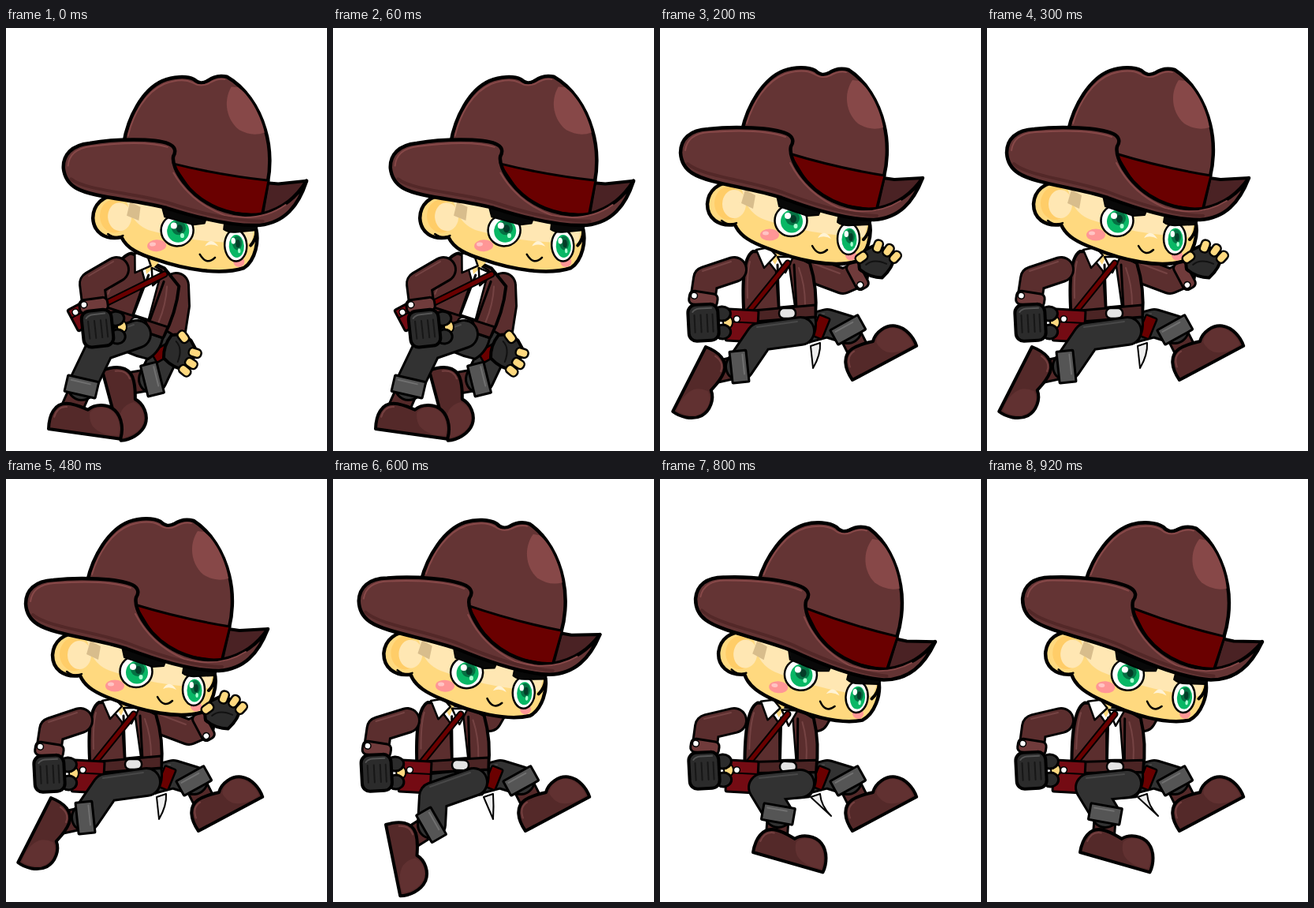
Recreate the animation shown at these times as an HTML page. Size 407 px wide and 536 px high, loop 1 s.

```html
<!DOCTYPE html>
<html lang="en">
<head>
<meta charset="utf-8">
<title>Running adventurer</title>
<style>
html, body { margin: 0; width: 100%; height: 100%; overflow: hidden; background: #fff; }
svg { display: block; width: 100%; height: 100%; }
</style>
</head>
<body>
<svg id="stage" viewBox="0 0 407 536" stroke-linejoin="round" stroke-linecap="round"></svg>
<script>
const C = {
  hat: '#643434', lit: '#874848', coat: '#5b2e2e', boot: '#542929', toe: '#613131',
  pants: '#323232', cuff: '#555', glove: '#2b2b2b', red: '#6a0000', bag: '#740b13',
  skin: '#ffd97f', pale: '#ffe7b3', deep: '#ffcd68'
};

// Which pose is held in each tenth of the loop.
const steps = [0, 1, 2, 3, 3, 3, 4, 5, 6, 6];

// Shift x, shift y, turn.
const head = [[54.5, 11, -3], [26, .5, -.7], [1, 0, 0], [0, 0, 0], [3, 2, 2], [7, 4.8, 3.3], [10, 5.5, 4.2]];
const torso = [[7, 13, 23], [5, 6, 8], [0, 0, 0], [0, 0, 0], [0, 1, 1.5], [1, 2, 2.5], [1, 3, 3.5]];

// Hip, knee, trouser cuff with its turn, boot heel with its turn.
const legKeys = ['hx', 'hy', 'kx', 'ky', 'cx', 'cy', 'ca', 'bx', 'by', 'ba'];
const asLeg = row => Object.fromEntries(legKeys.map((k, i) => [k, row[i]]));
const nearLeg = [
  [166, 388, 120, 404, 96, 454, 13, 54, 508, 8],
  [178, 386, 122, 398, 97, 442, 52, 34, 453, 61],
  [178, 384, 127, 391, 101, 429, 84, 58, 404, 117],
  [178, 384, 127, 391, 101, 429, 84, 57, 404, 117],
  [178, 384, 127, 402, 125, 438, 60, 67, 438, 78.6],
  [178, 386, 129, 393, 141, 432, 25, 95, 467, 39.6],
  [178, 386, 130, 391, 150, 424, 10, 118, 473, 16]
].map(asLeg);
const farRun = [182, 382, 212, 374, 238, 382, -29, 244, 446, -28];
const farLeg = [
  [180, 390, 205, 405, 186, 445, 76, 122, 434, 75],
  [185, 387, 221, 402, 220, 433, 10, 173, 476, 21.6],
  farRun, farRun, farRun, farRun, farRun
].map(asLeg);

// Near arm: sleeve points, hand x, y, turn. The run poses differ only slightly.
const nearArm = [
  { s: [140, 306, 109, 324, 112, 348], h: [122, 380, -6], cuff: [111, 351, -8] },
  { s: [116, 302, 82, 318, 82, 342], h: [92, 374, 4], cuff: [82, 348, 12] },
  ...[0, 0, 1, 2, 4].map((k, i) => ({
    s: [94, 306, 58 + k / 2, 318 - k, 55 + k / 2, 338 - k / 2],
    h: [61 + k / 4, 373 - k, -3], cuff: [55 + k / 2, 343 - k, 9]
  }))
];
const farRaised = { s: [200, 309, 232, 321, 248, 314], cuff: [250, 314, -118], h: [272, 297, -60] };
const farTucked = { s: [192, 302, 198, 304, 206, 290] };
const farArm = [
  { s: [216, 326, 217, 352, 212, 384], h: [219, 408, 28] },
  { s: [202, 318, 216, 354, 236, 362], cuff: [239, 362, -78], h: [265, 368, 0] },
  farRaised, farRaised, farTucked, farTucked, farTucked
];

// Strap ends, bag place, turn and size.
const bagRun = { strap: 'M162 298L111 361', at: [104, 377, 3], r: 20 };
const bag = [
  { strap: 'M201 312L92 366', at: [98, 364, -28], r: 15 },
  { strap: 'M187 300L116 362', at: [104, 369, 5], r: 18 },
  bagRun, bagRun, bagRun, bagRun, bagRun
];

// Sheath x, y, turn and the tip of the blade.
const knifeRun = [204, 379, 22];
const knife = [
  [200, 411, 60, 0, 0], [207, 398, 8, 185, 449],
  [...knifeRun, 194, 431], [...knifeRun, 194, 431],
  [...knifeRun, 203, 431], [...knifeRun, 212, 428], [...knifeRun, 217, 427]
];

const path = (d, fill = 'none', w = 3, line = '#000') =>
  `<path d="${d}" fill="${fill}" stroke="${w ? line : 'none'}" stroke-width="${w}"/>`;
const oval = (x, y, rx, ry, fill, w = 0) =>
  `<ellipse cx="${x}" cy="${y}" rx="${rx}" ry="${ry}" fill="${fill}" stroke="${w ? '#000' : 'none'}" stroke-width="${w}"/>`;
const box = (x, y, w, h, r, fill, line = 3) =>
  `<rect x="${x}" y="${y}" width="${w}" height="${h}" rx="${r}" fill="${fill}" stroke="#000" stroke-width="${line}"/>`;
const put = ([x, y, a], body) => `<g transform="translate(${x} ${y}) rotate(${a})">${body}</g>`;
const turn = ([x, y, a], px, py, body) =>
  `<g transform="translate(${x} ${y}) rotate(${a} ${px} ${py})">${body}</g>`;

function limb(p, w, fill) {
  const d = `M${p[0]} ${p[1]}` + (p.length > 4 ? `Q${p[2]} ${p[3]} ${p[4]} ${p[5]}` : `L${p[2]} ${p[3]}`);
  return path(d, 'none', w + 6) + path(d, 'none', w, fill);
}

function bend(p, w, fill, shine) {
  const d = `M${p[0]} ${p[1]}L${p[2]} ${p[3]}L${p[4]} ${p[5]}`;
  const hi = `M${p[0] - 4} ${p[1] - w / 2 + 4}L${p[2] - 4} ${p[3] - w / 2 + 4}`;
  return path(d, 'none', w + 6) + path(d, 'none', w, fill) + path(hi, 'none', 2, shine);
}

function boot() {
  return path('M0 0C-2-18 3-33 18-35C30-36 38-33 46-31C54-40 70-42 80-35C91-27 94-11 92 0Z', C.boot, 4) +
    path('M49-28C56-38 70-39 79-32C88-25 90-12 89-4C76-1 63-4 55-11Q49-18 49-28Z', C.toe, 0) +
    path('M5-16Q7-30 19-31', 'none', 2, '#754040');
}

function leg(l) {
  const a = l.ba * Math.PI / 180, x = 24, y = -24;
  const ax = l.bx + x * Math.cos(a) - y * Math.sin(a);
  const ay = l.by + x * Math.sin(a) + y * Math.cos(a);
  return limb([l.cx, l.cy, ax, ay], 24, C.boot) +
    put([l.bx, l.by, l.ba], boot()) +
    bend([l.hx, l.hy, l.kx, l.ky, l.cx, l.cy], 32, C.pants, '#484848') +
    put([l.cx, l.cy, l.ca], box(-20, -10, 40, 21, 1, C.cuff) + path('M-15-5H10', 'none', 2, '#707070'));
}

function sleeve(arm) {
  return bend(arm.s, 28, C.coat, '#754343') +
    (arm.cuff ? put(arm.cuff, box(-18, -8, 36, 17, 6, '#703b3b') + oval(-12, -2, 4, 4, '#fff', 1.5)) : '');
}

function nearHand(at) {
  const grooves = [-17, -9, -1, 6].map(x => path(`M${x}-10V12`, 'none', 2, '#171717')).join('');
  return put(at, oval(25, 1, 6, 8, C.skin, 2) + oval(18, -10, 11, 9, C.glove, 3) +
    oval(18, 13, 10, 9, C.glove, 3) + box(-25, -23, 38, 46, 10, C.glove, 4) +
    path('M-19-14Q-16-18-10-18H5', 'none', 2, '#555') + grooves);
}

function farHand(at) {
  const finger = (x, y, a) => put([x, y, a], box(-8, -6, 16, 11, 5, C.skin, 2.5));
  return put(at, path('M-17-12Q-6-22 8-18L20-10Q24 4 18 18Q6 24-12 18Q-20 4-17-12Z', C.glove, 4) +
    path('M-8-8Q4-4 6 14', 'none', 2, '#111') +
    finger(-3, -17, 25) + finger(20, -6, -10) + finger(22, 8, 5) + finger(19, 20, 12));
}

function coat() {
  return path('M120 374L196 364Q201 382 190 398Q160 404 126 396Z', C.pants) +
    path('M118 283C104 291 104 330 107 372L197 366Q200 330 190 298L164 284Z', C.coat, 4) +
    path('M128 284L162 288L171 352L150 354L147 308Z', '#fff', 2.5) +
    path('M133 280H155L146 300Z', C.skin, 0) +
    path('M149 300L151 355M170 300L173 355', 'none', 3) +
    path('M176 304Q184 326 184 350M114 296Q110 312 111 342', 'none', 2, '#754343') +
    path('M107 359L197 351V366L107 373Z', '#4b2424') +
    path('M122 281L132 304L147 288L138 278ZM149 290L159 310L169 290Z', '#fff', 2.5) +
    box(151, 355, 21, 13, 6, '#e4e4e4', 2.5);
}

function satchel(b) {
  const r = b.r;
  return path(b.strap, 'none', 9) + path(b.strap, 'none', 5, C.red) +
    put(b.at, box(-r, -r, 2 * r, 2 * r, 2, C.bag) + path(`M${-r} -4H${r}`, 'none', 2) +
      oval(-7, -8, 4, 4, '#fff', 1.5));
}

function blade([x, y, a, tx, ty]) {
  return tx ? path(`M${x - 13} ${y + 24}L${tx} ${ty}Q${x} ${y + 35} ${x - 1} ${y + 20}Z`, '#eee', 2) : '';
}
const sheath = ([x, y, a]) => put([x, y, a], box(-8, -14, 15, 28, 2, C.red, 2.5));

function face() {
  return path('M264 244C269 262 262 287 247 296C218 304 174 295 135 279C116 272 100 264 94 249' +
      'C73 252 59 241 59 223C60 206 73 195 92 195Z', C.skin, 4.5) +
    path('M92 199Q103 198 105 214Q112 236 132 243Q188 262 258 265L263 244L150 208Z', C.pale, 0) +
    oval(86, 222, 18, 21, C.deep) + oval(93, 223, 15, 18, C.pale) +
    path('M77 244Q87 252 96 247', 'none', 2.5) +
    path('M107 205L120 212L117 229L102 222Z', '#d8bd8c', 0) +
    path('M257 268Q265 260 265 248', 'none', 4) +
    oval(138, 262, 12, 7.5, '#ff9696') + oval(133, 260, 4, 2.5, '#ffc4c4') +
    oval(241, 288, 7, 6.5, '#ff9696') + oval(239, 286, 2.5, 2, '#ffc4c4') +
    path('M199 266Q207 253 216 267Q207 262 199 266Z', '#fff3d5', 0) +
    path('M192 276Q200 291 211 281', 'none', 2.5) +
    eye(165, 244, 20.5) + eye(238, 267, 14) +
    path('M147 212L150 226L186 238L200 237L206 222ZM226 234L224 246Q230 251 241 250L264 249L271 236Z', '#080808', 2);
}

function eye(x, y, rx) {
  const k = rx / 20.5;
  return oval(x, y, rx, 20, '#fff', 2.5) + oval(x + 1, y + 1, 14 * k, 14.5, '#08b765') +
    oval(x + 2, y - 3, 9 * k, 9, '#057143') + oval(x + 3, y - 2, 4 * k, 5, '#043c28') +
    oval(x - 4 * k, y - 6, 4 * k, 4, '#fff') + oval(x + 6 * k, y + 7, 2.5 * k, 3, '#a9ffd1');
}

function hat() {
  return path('M282 190L296 192L332 190Q312 224 270 234Z', '#4a2224', 4) +
    path('M103 130C110 98 130 64 156 54C170 49 187 49 196 54C202 60 207 60 213 57C222 51 231 51 238 53' +
      'C260 67 276 93 283 122C290 150 286 176 283 188L273 232L165 200Z', C.hat, 4.5) +
    path('M243 66C231 84 235 108 250 121Q266 131 282 126C278 102 264 76 251 67Z', C.lit, 0) +
    path('M109 121C117 94 134 67 158 58Q181 51 194 58Q204 65 215 60Q226 54 235 56', 'none', 2, C.lit) +
    path('M163 159Q222 177 284 187L273 231L200 220Z', C.red) +
    path('M25 158C25 141 37 129 60 128C94 124 142 126 160 134C168 138 169 144 165 150' +
      'C161 165 182 202 218 219C238 228 258 231 274 229C301 223 318 210 332 190' +
      'C320 221 302 241 270 243C236 243 193 230 153 215C112 202 60 197 40 184Q26 175 25 158Z', C.hat, 4.5) +
    path('M31 155Q34 134 61 132Q128 127 158 138M164 171Q184 210 226 228Q270 240 304 219', 'none', 2, C.lit) +
    path('M34 172C52 188 112 193 154 208Q226 236 274 238', 'none', 4, '#532828');
}

function draw(i) {
  const far = farArm[i];
  return blade(knife[i]) + sleeve(far) + leg(farLeg[i]) + sheath(knife[i]) +
    turn(torso[i], 161, 361, coat()) + satchel(bag[i]) + leg(nearLeg[i]) +
    sleeve(nearArm[i]) + nearHand(nearArm[i].h) +
    turn(head[i], 190, 290, face() + hat()) + (far.h ? farHand(far.h) : '');
}

const stage = document.getElementById('stage');
const start = performance.now();
let shown = -1;

function update(now) {
  const t = Math.max(0, now - start) % 1000;
  const i = steps[Math.floor(t / 100)];
  if (i !== shown) stage.innerHTML = draw(shown = i);
  requestAnimationFrame(update);
}
update(start);
</script>
</body>
</html>
```
